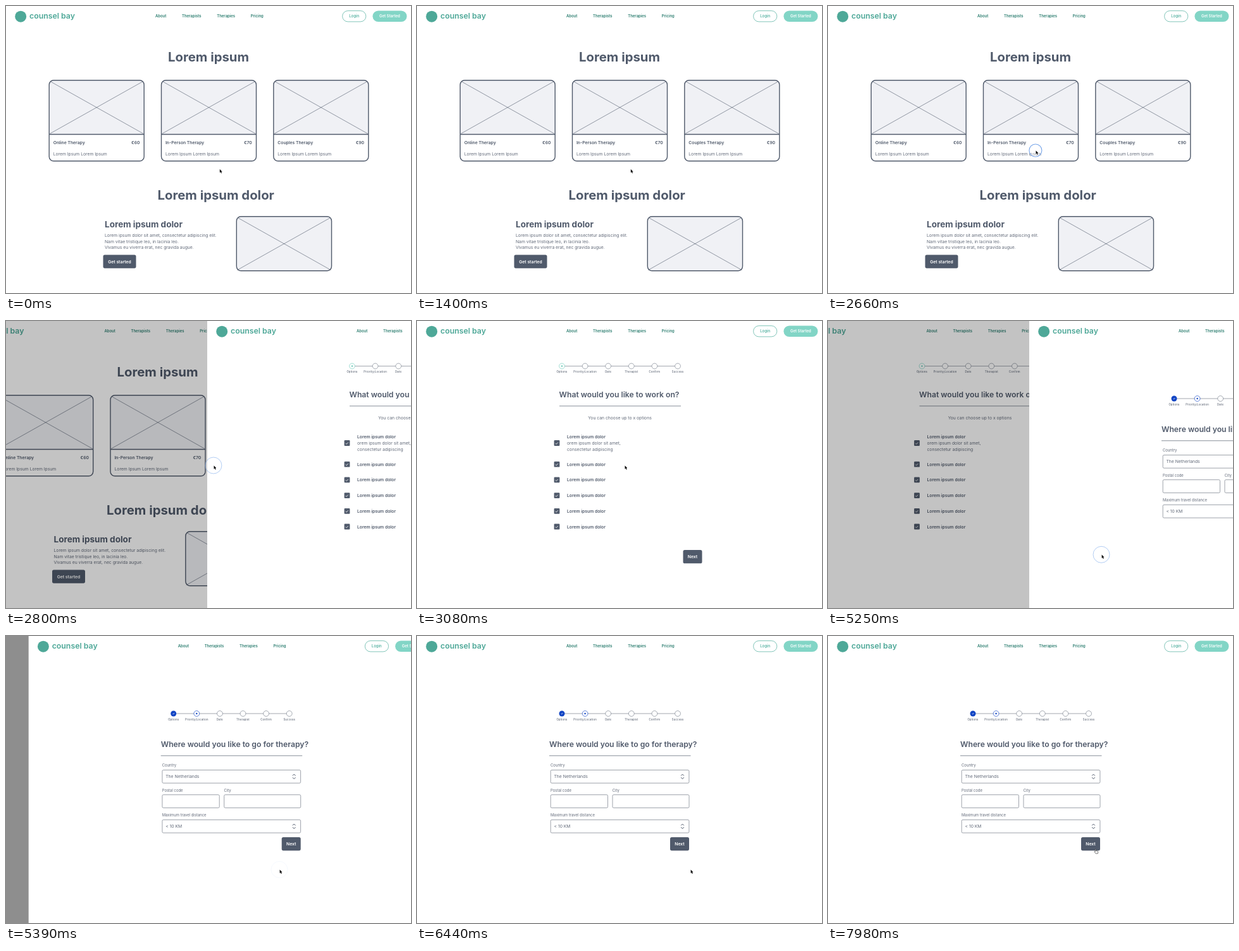
Animation of 640 by 455 pixels, one loop 8 s. Source, as an HTML page:

```html
<!DOCTYPE html>
<html lang="en">
<head>
<meta charset="utf-8">
<title>Booking flow</title>
<style>
  html, body { margin: 0; width: 100%; height: 100%; overflow: hidden; background: #fff; }
  svg { display: block; width: 100vw; height: 100vh; font-family: Inter, sans-serif; }
</style>
</head>
<body>
<svg id="stage" viewBox="0 0 640 455"></svg>
<script>
const DARK = '#505a6b', SOFT = '#626a79', PALE = '#f0f1f5', BLUE = '#1245c4';
const SMALL = 5.93, BODY = 6.77, HEADING = 12.2;

const text = (x, y, str, size = BODY, weight = 400, fill = SOFT, extra = '') =>
  `<text x="${x}" y="${y}" font-size="${size}" font-weight="${weight}" fill="${fill}" ${extra}>${str}</text>`;
const centred = (x, y, str, size, weight, fill, extra = '') =>
  text(x, y, str, size, weight, fill, `text-anchor="middle" ${extra}`);
const box = (x, y, w, h, r, fill, stroke = 'none', sw = 0) =>
  `<rect x="${x}" y="${y}" width="${w}" height="${h}" rx="${r}" fill="${fill}" stroke="${stroke}" stroke-width="${sw}"/>`;
const path = (d, stroke, sw, fill = 'none') =>
  `<path d="${d}" fill="${fill}" stroke="${stroke}" stroke-width="${sw}" stroke-linejoin="round"/>`;
const circle = (x, y, r, fill, stroke = 'none', sw = 0.7) =>
  `<circle cx="${x}" cy="${y}" r="${r}" fill="${fill}" stroke="${stroke}" stroke-width="${sw}"/>`;
const tick = (x, y, k) => path(`M${x - 2 * k} ${y}l${1.4 * k} ${1.4 * k}l${2.7 * k} ${-2.8 * k}`, '#fff', 0.8);
const button = (x, y, w, label) =>
  box(x, y, w, 21.2, 2.6, DARK) + centred(x + w / 2, y + 13.1, label, BODY, 600, '#fff');

function header() {
  const links = [[236, 'About'], [278, 'Therapists'], [333.3, 'Therapies'], [386.7, 'Pricing']];
  return circle(23.2, 16.7, 9, '#4ea898') +
    text(37, 20.2, 'counsel bay', 12.3, 600, '#4ea898') +
    links.map(([x, label]) => text(x, 18.4, label, SMALL, 600, '#2b7d6f')).join('') +
    box(531.6, 7.6, 37.2, 17.3, 8.65, '#fff', '#62b6a7', 0.8) +
    centred(550.1, 18.4, 'Login', SMALL, 600, '#58b3a3') +
    box(579.4, 7.4, 54, 17.7, 8.85, '#82d5c6') +
    centred(606.4, 18.4, 'Get Started', SMALL, 600, '#fff');
}

const cross = (x, y, w, h) =>
  path(`M${x + 2} ${y + 2}L${x + w - 1} ${y + h - 1}M${x + w - 2} ${y + 2}L${x + 1} ${y + h - 1}`, DARK, 0.6);

function card(x, name, price) {
  return box(x, 117.7, 150, 128, 7, '#fff') +
    path(`M${x} 203.5v-78.8q0-7 7-7h136q7 0 7 7v78.8z`, 'none', 0, PALE) +
    cross(x, 117.7, 150, 85.8) +
    path(`M${x} 203.5h150`, DARK, 1.3) +
    box(x, 117.7, 150, 128, 7, 'none', DARK, 1.4) +
    text(x + 6.5, 218.5, name, BODY, 600, DARK) +
    text(x + 143.3, 218.5, price, BODY, 600, DARK, 'text-anchor="end"') +
    text(x + 6.5, 236.5, 'Lorem Ipsum Lorem Ipsum');
}

function homePage() {
  const lines = ['Lorem ipsum dolor sit amet, consectetur adipiscing elit.',
    'Nam vitae tristique leo, in lacinia leo.', 'Vivamus eu viverra erat, nec gravida augue.'];
  return centred(320, 88, 'Lorem ipsum', 20.32, 700, DARK) +
    card(68.2, 'Online Therapy', '€60') +
    card(245.5, 'In-Person Therapy', '€70') +
    card(422.8, 'Couples Therapy', '€90') +
    centred(331.7, 306.8, 'Lorem ipsum dolor', 20.32, 700, DARK) +
    text(156, 350.5, 'Lorem ipsum dolor', 13.55, 700, DARK) +
    lines.map((line, i) => text(156, 366.2 + i * 9.6, line)).join('') +
    button(153.5, 394.5, 52, 'Get started') +
    box(364.3, 333.7, 150.2, 86, 7, PALE) + cross(364.3, 333.7, 150.2, 86) +
    box(364.3, 333.7, 150.2, 86, 7, 'none', DARK, 1.4);
}

function stepper(y, current, accent) {
  const names = ['Options', 'Priority/Location', 'Date', 'Therapist', 'Confirm', 'Success'];
  return path(`M229 ${y}H412`, '#7b828e', 0.7) + names.map((name, i) => {
    const x = 229 + i * 36.6;
    const mark = i < current ? circle(x, y, 4.5, accent) + tick(x, y, 0.65)
      : circle(x, y, 4.4, '#fff', i === current ? accent : '#777f8b', 0.65) +
        (i === current ? circle(x, y, 1.2, accent) : '');
    return mark + centred(x, y + 10.5, name, 4.23, 500, SOFT, 'letter-spacing=".2"');
  }).join('');
}

function optionsPage() {
  const label = y => text(237, y, 'Lorem ipsum dolor', BODY, 600, DARK);
  const check = y => box(216.6, y - 4.4, 8.8, 8.8, 1.2, DARK) + tick(220.7, y + 0.4, 1);
  return stepper(71.5, 0, '#72cbbb') +
    text(224.5, 121.3, 'What would you like to work on?', HEADING, 600, DARK) +
    path('M225 134.8H417', '#69717e', 0.8) +
    centred(320.5, 156, 'You can choose up to x options') +
    check(193.5) + label(186.3) +
    text(237, 196.1, 'orem ipsum dolor sit amet,') + text(237, 205.7, 'consectetur adipiscing') +
    [0, 1, 2, 3, 4].map(i => check(227.2 + i * 24.7) + label(229.7 + i * 24.7)).join('') +
    button(420.5, 363.1, 30, 'Next');
}

function locationPage() {
  const field = (x, y, w, label, value = '') =>
    text(x, y - 5.2, label, SMALL) + box(x + 0.2, y, w, 20.7, 1.8, '#fff', '#747b87', 0.7) +
    text(x + 5.5, y + 12.8, value) +
    (value && path(`M417.2 ${y + 9}l2.3-2.4l2.3 2.4M417.2 ${y + 11.7}l2.3 2.4l2.3-2.4`, DARK, 1));
  return stepper(123, 1, BLUE) +
    text(209, 176.3, 'Where would you like to go for therapy?', HEADING, 600, DARK) +
    path('M209 189.8H432.5', '#69717e', 0.8) +
    field(211, 212.5, 218.7, 'Country', 'The Netherlands') +
    field(211, 251.7, 90.3, 'Postal code') +
    field(308.8, 251.7, 121, 'City') +
    field(211, 291.4, 218.7, 'Maximum travel distance', '&lt; 10 KM') +
    button(400, 319, 30, 'Next');
}

const ARROW = 'M0 0V5.4L1.3 4.3L2.2 6.5L3.2 6.1L2.3 4H3.9Z';
const HAND = 'M-.6 .5Q0-.4 .6 .5V3L3 3.4Q4.2 3.7 4 5L3.5 7.3H.3L-1.8 4.6Q-1.8 3.6-.6 4.3Z';
const stage = document.getElementById('stage');
stage.innerHTML = [homePage, optionsPage, locationPage].map(page =>
  `<g class="page">${box(0, 0, 640, 455, 0, '#fff')}${header()}${page()}</g>`).join('') +
  `<rect id="shade" width="640" height="455"/>
  <circle id="ring" fill="#fff" fill-opacity=".35" stroke="#78a6ea"/>
  <g id="cursor">
    <g id="arrow">${path(ARROW, '#fff', 0.9, '#fff')}${path(ARROW, 'none', 0, '#000')}</g>
    <g id="hand">${path(HAND, '#222', 0.6, '#fff')}</g>
  </g>`;

const pages = [...stage.querySelectorAll('.page')];
const part = id => document.getElementById(id);
const show = (node, visible) => { node.style.display = visible ? '' : 'none'; };
const shade = part('shade'), ring = part('ring'), cursor = part('cursor');

const LOOP = 8000, STEP = 70, SLIDE_DELAY = 36.5, SLIDE = 300;
const clicks = [2660, 5110];
const moves = [ // start, end, from, to
  [1700, 2450, [337.8, 258.8], [328.5, 229.3]],
  [3500, 4400, [328.5, 229.3], [432.6, 370.6]],
  [7100, 7800, [432.6, 370.6], [422.8, 337.6]]
];
const clamp = v => Math.min(1, Math.max(0, v));
const easeInOut = u => u * u * (3 - 2 * u);

// cubic-bezier(0, 0, .58, 1), solved for its parameter by bisection
function easeOut(u) {
  if (u <= 0 || u >= 1) return u;
  let lo = 0, hi = 1;
  for (let i = 0; i < 24; i++) {
    const s = (lo + hi) / 2;
    if (1.74 * s * s * (1 - s) + s ** 3 < u) lo = s; else hi = s;
  }
  return 3 * lo * lo - 2 * lo ** 3;
}

function pointer(t) {
  const [start, end, from, to] = moves.filter(m => t >= m[0]).pop() || moves[0];
  const u = easeInOut(clamp((t - start) / (end - start)));
  return from.map((v, i) => v + (to[i] - v) * u);
}

function draw(t) {
  const slides = clicks.map(c => easeOut(clamp((t - c - SLIDE_DELAY) / SLIDE)));
  const top = slides.filter(p => p > 0).length;
  const p = top ? slides[top - 1] : 1;
  const sliding = p < 1;
  pages.forEach((page, i) => {
    show(page, i === top || sliding && i === top - 1);
    page.setAttribute('transform', `translate(${i === top ? 640 * (1 - p) : -160 * p})`);
  });
  show(shade, sliding);
  shade.setAttribute('opacity', 0.47 * p);
  if (sliding) stage.insertBefore(shade, pages[top]);

  const [x, y] = pointer(t);
  const inside = (l, r, a, b) => x > l && x < r && y > a && y < b;
  const overButton = !sliding &&
    (top === 1 && inside(420, 451, 363, 385) || top === 2 && inside(400, 430, 319, 340));
  cursor.setAttribute('transform', `translate(${x} ${y})`);
  show(part('hand'), overButton);
  show(part('arrow'), !overButton);

  const click = clicks.find(c => t >= c - 40 && t < c + 300);
  show(ring, click);
  if (click) {
    const age = t - click, grow = clamp(age / 140);
    ring.setAttribute('cx', x - 0.6);
    ring.setAttribute('cy', y - 0.3);
    ring.setAttribute('r', 10 + 3 * grow);
    ring.setAttribute('stroke-width', 1.1 - 0.4 * grow);
    ring.setAttribute('opacity', 1 - 0.2 * grow - 0.8 * clamp((age - 140) / 160));
  }
}

const begin = performance.now();
function tickClock() {
  const t = (performance.now() - begin) % LOOP;
  draw(Math.floor(t / STEP) * STEP);
  requestAnimationFrame(tickClock);
}
tickClock();
</script>
</body>
</html>
```
